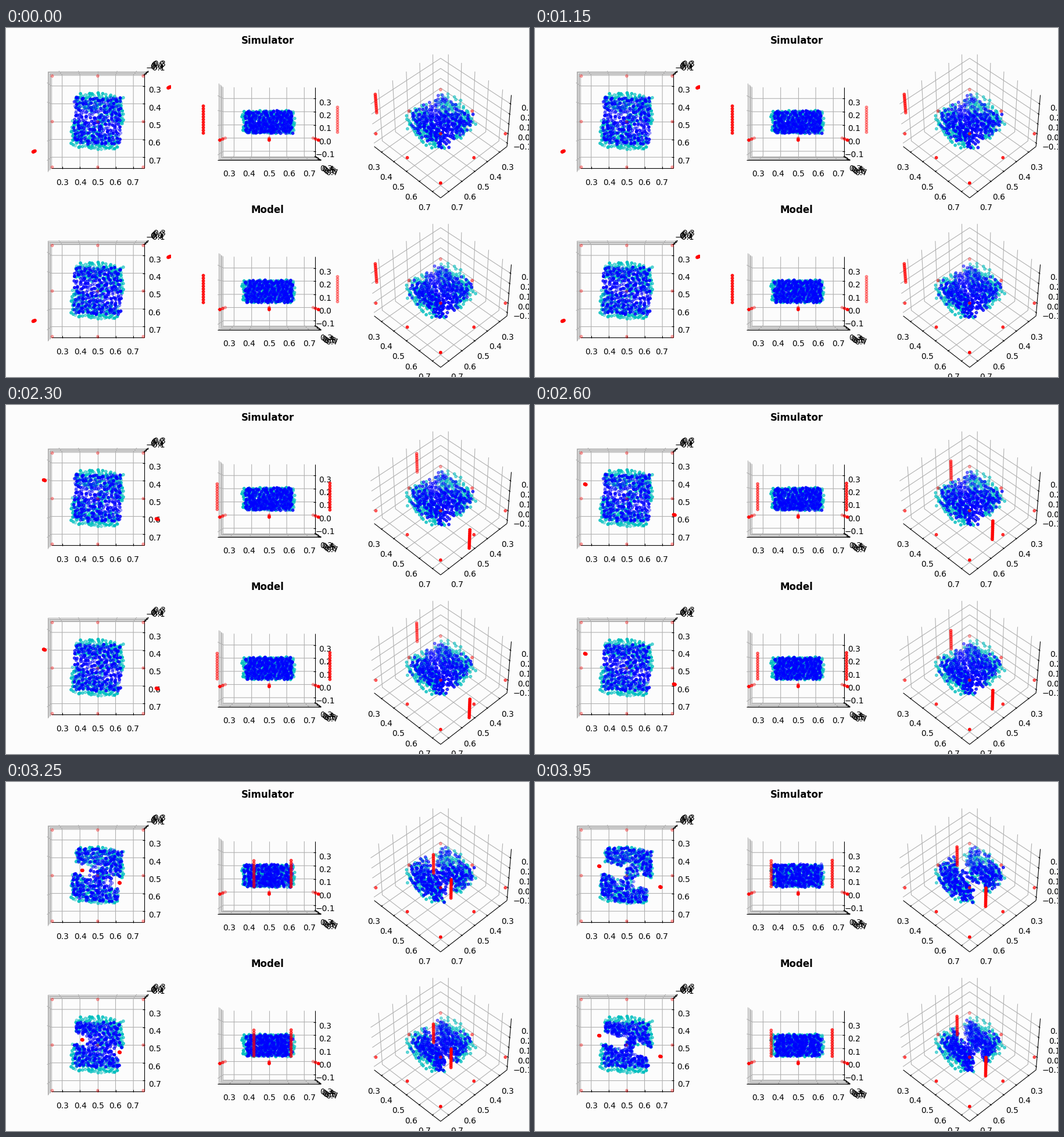
Write a matplotlib script that moves like this. It is 900 by 600 pixels and loops after 4 s.

```python
import numpy as np
import matplotlib.pyplot as plt
from matplotlib.animation import FuncAnimation
from matplotlib.collections import LineCollection
from matplotlib.patches import Rectangle

plt.rcParams["font.family"] = "DejaVu Sans"

W, H, DPI = 900, 600, 100
FRAMES, INTERVAL = 80, 50
VIEWS = [(90, -90), (0, -90), (45, -45)]
COLS = [157.9, 452.9, 747.9]
ROWS = [160.9, 452.2]
SCALE, DIST = 1400, 10
CENTER = np.array([0.5, 0.5, 0.125])
UNIT = np.array([16, -16, 12]) / 7          # box units per data unit
EX, _, EZ = np.abs(UNIT) * 0.25 * 25 / 24   # half extents of the box
PAD = 0.141                                 # tick label offset
N = 300
CLAY = np.array([0.499, 0.498, 0.121])      # middle of the clay block

# Gripper motion: (left, right) rods
IDLE = np.array([[0.1588, 0.6597], [0.8828, 0.3171]])
START = np.array([[0.1498, 0.3794], [0.8819, 0.6317]])
STEP = np.array([[0.0107, 0.00371], [-0.0106, -0.00371]])
GRIP, CLOSE = 40, 29
ROD_Z = np.linspace(0.046, 0.232, 11)


def world(p):
    return (np.asarray(p, float) - CENTER) * UNIT


def project(p, view, origin):
    """Perspective projection of box coordinates to pixels and depth."""
    el, az = np.radians(view)
    eye = np.array([np.cos(el) * np.cos(az), np.cos(el) * np.sin(az), np.sin(el)])
    right = np.array([-np.sin(az), np.cos(az), 0])
    up = np.cross(eye, right)
    p = np.asarray(p, float)
    depth = DIST - p @ eye
    xy = np.column_stack([p @ right, -(p @ up)]) / depth[:, None]
    return np.array(origin) + SCALE * xy, depth


def cloud(seed, half):
    """Evenly scattered points filling a block."""
    rng = np.random.default_rng(seed)
    ratios = 1.22074408 ** -np.arange(1.0, 4)
    u = rng.uniform(size=3) + np.arange(N)[:, None] * ratios
    u = 2 * ((u + rng.normal(0, 0.015, (N, 3))) % 1) - 1
    return CLAY + u * [half, half, 0.08]


def pressure(deep):
    return np.clip((deep - 18) / 8, 0, 1)


def pinch(p, deep, reach, radius=0.03):
    """Push points away from the channels cut by both rods."""
    out = p.copy()
    force = pressure(deep)
    if force == 0:
        return out
    for start, step in zip(START, STEP):
        path = step * deep
        rel = p[:, :2] - start
        along = np.clip(rel @ path / (path @ path), 0, 1)
        away = rel - along[:, None] * path
        dist = np.linalg.norm(away, axis=1) + 1e-9
        push = force * radius * np.clip(1 - dist / reach, 0, 1)
        out[:, :2] += away / dist[:, None] * push[:, None]
    return out


def squeeze(p, deep):
    """Pinch the block and let its free sides bulge."""
    p = pinch(p, deep, 0.14)
    force = pressure(deep)
    dx, dy = (p[:, :2] - CLAY[:2]).T
    p[:, 0] -= 0.08 * force * dy
    p[:, 1] += force * dy * (0.14 - 0.16 * (dx / 0.13) ** 2)
    return p


GOAL = squeeze(cloud(3, 0.132), CLOSE)
SIM = cloud(11, 0.128)
MODEL = cloud(25, 0.127)
hollow = np.hypot((SIM[:, 0] - 0.47) / 0.06, (SIM[:, 1] - 0.44) / 0.04) < 1
SIM[hollow, 2] = 0.04 + 0.5 * (SIM[hollow, 2] - 0.04)
PHASE = np.random.default_rng(8).uniform(0, 2 * np.pi, (N, 3))
LIFT = np.random.default_rng(9).uniform(0, 1, N) ** 3
FLOOR = np.array([(x, y, 0) for x in (0.25, 0.5, 0.75) for y in (0.25, 0.5, 0.75)])


def grippers(i):
    if i < GRIP:
        tips = IDLE
    else:
        k = min(i - GRIP, 2 * CLOSE + GRIP - i)
        tips = START + k * STEP
    rods = [np.column_stack([np.tile(t, (len(ROD_Z), 1)), ROD_Z]) for t in tips]
    return np.vstack([FLOOR] + rods)


def simulated(i):
    deep = min(i - GRIP, CLOSE)
    p = squeeze(SIM + 0.0006 * np.sin(0.35 * i + PHASE), deep)
    p[:, 2] += 0.02 * LIFT * pressure(deep)
    return p


def modelled(i):
    shrink = 1 - 0.045 * np.clip((i - GRIP) / 20, 0, 1)
    return pinch(CLAY + (MODEL - CLAY) * shrink, min(i - GRIP, CLOSE), 0.08)


fig = plt.figure(figsize=(W / DPI, H / DPI), dpi=DPI, facecolor="#fcfcfc")
ax = fig.add_axes([0, 0, 1, 1])
ax.set(xlim=(0, W), ylim=(H, 0))
ax.axis("off")


def draw_box(view, origin):
    def path(*pts):
        return project(pts, view, origin)[0]

    def lines(paths, color, z):
        ax.add_collection(LineCollection(paths, colors=color, linewidths=0.8, zorder=z),
                          autolim=False)

    grid, ticks, labels = [], [], []
    inner, outer = EX - 0.019, EX + 0.0095
    low, far = -EZ - 0.75 * PAD, EX + PAD
    for v in np.arange(3, 8) / 10:
        x, y, _ = world([v, v, 0])
        grid += [path((x, EX, EZ), (x, EX, -EZ), (x, -EX, -EZ)),
                 path((-EX, y, EZ), (-EX, y, -EZ), (EX, y, -EZ))]
        ticks += [path((x, -inner, -EZ), (x, -outer, -EZ)),
                  path((inner, y, -EZ), (outer, y, -EZ))]
        labels += [(v, (x, -far, low)), (v, (far, y, low))]
    for v in np.arange(-1, 4) / 10:
        z = world([0, 0, v])[2]
        grid.append(path((EX, EX, z), (-EX, EX, z), (-EX, -EX, z)))
        ticks.append(path((inner, EX, z), (outer, EX, z)))
        labels.append((v, (far, far, z)))
    edges = [path((-EX, -EX, -EZ), (EX, -EX, -EZ)),
             path((EX, -EX, -EZ), (EX, EX, -EZ)),
             path((EX, EX, -EZ), (EX, EX, EZ))]
    lines(grid, "#b0b0b0", 1)
    lines(edges + ticks, "black", 2)
    for v, p in labels:
        x, y = path(p)[0]
        ax.text(x, y, f"{v:.1f}".replace("-", "\u2212"), fontsize=10,
                ha="center", va="top", zorder=3)


class Dots:
    """Depth-sorted, depth-faded markers in one panel."""

    def __init__(self, view, origin, rgb, z):
        self.view, self.origin, self.rgb = view, origin, rgb
        self.art = ax.scatter([], [], s=10, zorder=z)
        x, y = origin
        self.art.set_clip_path(Rectangle(
            (x - 0.095 * SCALE, y - 0.09 * SCALE), 0.185 * SCALE, 0.185 * SCALE,
            transform=ax.transData))

    def place(self, points):
        xy, depth = project(world(points), self.view, self.origin)
        order = np.argsort(-depth)
        near = -1 / depth[order]
        fade = 1 - 0.7 * (near - near.min()) / np.ptp(near)
        self.art.set_offsets(xy[order])
        self.art.set_color([(*self.rgb, a) for a in fade])


panels = []
for row, (cy, title) in enumerate(zip(ROWS, ["Simulator", "Model"])):
    ax.text(450, 27 + 291 * row, title, fontsize=12, fontweight="semibold",
            ha="center", va="baseline")
    for view, cx in zip(VIEWS, COLS):
        origin = (cx, cy)
        draw_box(view, origin)
        Dots(view, origin, (0, 0.75, 0.75), 4).place(GOAL)
        panels.append((row, Dots(view, origin, (0, 0, 1), 5),
                       Dots(view, origin, (1, 0, 0), 6)))


def update(i):
    clay = simulated(i), modelled(i)
    tools = grippers(i)
    for row, body, rods in panels:
        body.place(clay[row])
        rods.place(tools)
    return [d.art for _, *pair in panels for d in pair]


anim = FuncAnimation(fig, update, frames=FRAMES, interval=INTERVAL,
                     repeat=True, repeat_delay=0, blit=False)
plt.show()
```
